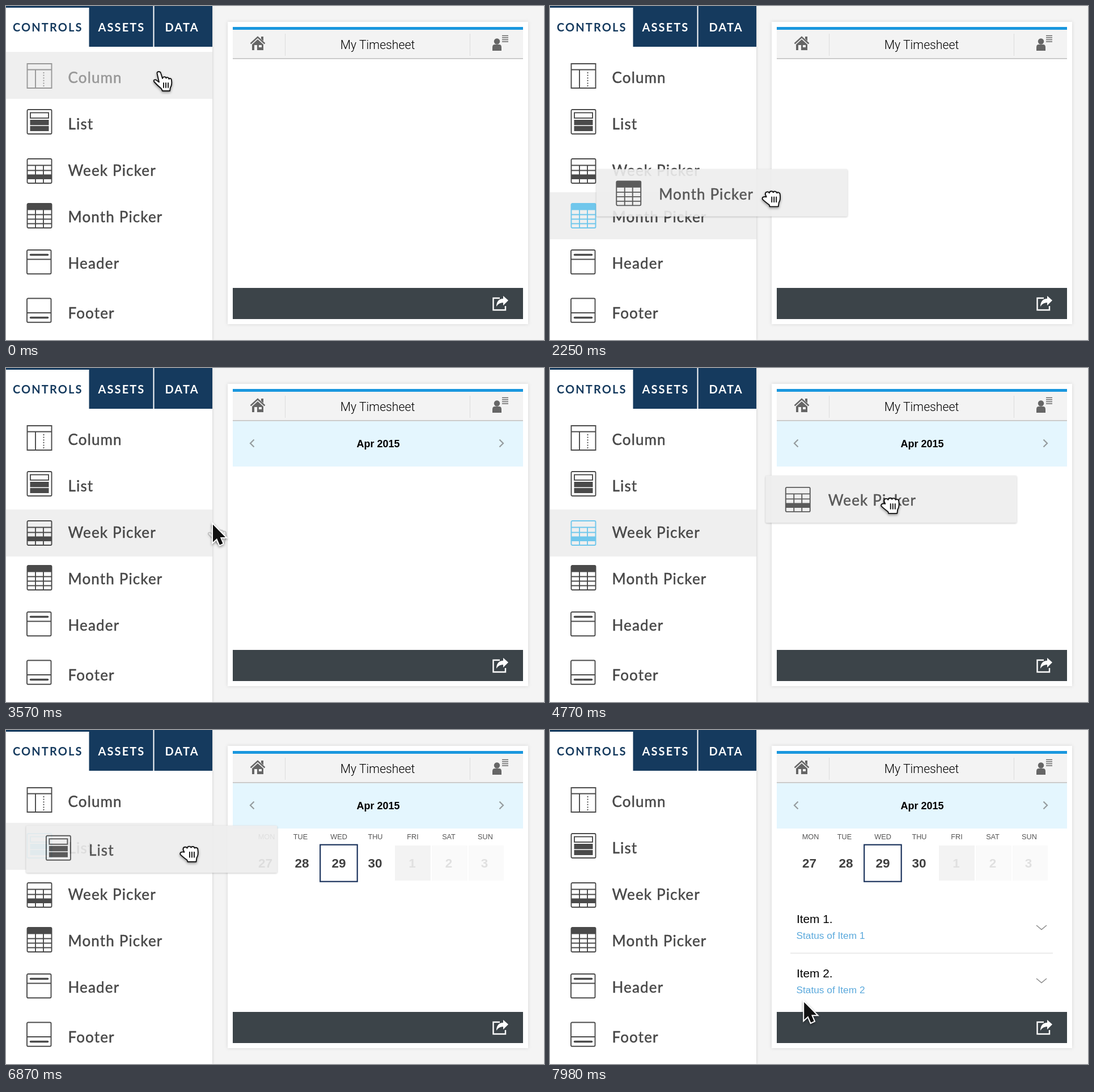
Recreate the animation shown at these times as an HTML page. Size 949 px wide and 590 px high, loop 8000 ms.

```html
<!DOCTYPE html>
<html lang="en">
<head>
<meta charset="utf-8">
<title>App builder</title>
<style>
html, body { margin: 0; width: 100%; height: 100%; overflow: hidden; background: #f4f4f4; }
svg { display: block; width: 949px; height: 590px; }
.label { font: 400 26px Lato, sans-serif; letter-spacing: 1.15px; fill: #484848; stroke: #484848; stroke-width: .5; }
.tab { font: 700 20px Lato, sans-serif; letter-spacing: 2.1px; }
.title { font: 300 21.2px Roboto, sans-serif; text-anchor: middle; }
.arial { font-family: "Liberation Sans", Arial, sans-serif; }
.mid { text-anchor: middle; }
.icon { color: #4a4a4a; fill: none; stroke: currentColor; stroke-width: 1.9; }
.icon .solid { fill: currentColor; stroke: none; }
.icon .bar { stroke-width: 3.6; stroke-linecap: round; }
.pointer { filter: drop-shadow(0 2px 2px rgba(0,0,0,.4)); }
.hand { fill: #fff; stroke: #151515; stroke-width: 1.9; stroke-linejoin: round; stroke-linecap: round; }
</style>
</head>
<body>
<script>
const LOOP = 8000;
const NAVY = '#153a5e';
const frame = '<rect x="1" y="1" width="43" height="43" rx="2"/>';
const smallFrame = '<rect x=".5" y="1" width="42.500" height="42.300" rx="2"/>';
const controls = [
  { name: 'Column', top: 81, iconY: 101, base: 135.7,
    icon: '<path d="M1 1H44V44H1ZM1 11.5H44M15.500 12V44"/><path d="M30 16V42" stroke-dasharray="2 2.6"/>' },
  { name: 'List', top: 164, iconY: 182, base: 217.7, tileIconY: 17,
    icon: frame + '<rect x="6.5" y="6.5" width="32" height="9.5"/><path class="solid" d="M6 19h33v9.500h-33zM6 30h33v9h-33z"/>' },
  { name: 'Week Picker', top: 250, iconY: 269, base: 299.7, tileIconY: 20,
    icon: frame + '<path d="M1 12.500H44M1 21.500H44M15.500 12V44M29.500 12V44"/><path class="solid" d="M1 28.500h43v8.500h-43z"/>' },
  { name: 'Month Picker', top: 329, iconY: 348, base: 381.7, tileIconY: 20,
    icon: frame + '<path d="M15.500 12V44M29.500 12V44M1 20.500H44M1 28.500H44M1 36.500H44"/><path class="solid" d="M1 1h43v11.500h-43z"/>' },
  { name: 'Header', top: 412, iconY: 430, base: 463.7,
    icon: smallFrame + '<path class="bar" d="M7 9.500H37"/><path d="M.5 17.500H43"/>' },
  { name: 'Footer', top: 499, iconY: 515.5, base: 551.7,
    icon: smallFrame + '<path d="M.5 26.500H43"/><path class="bar" d="M7 35H37"/>' }
];

const rect = (x, y, w, h, fill, extra = '') =>
  `<rect x="${x}" y="${y}" width="${w}" height="${h}" fill="${fill}" ${extra}/>`;
const text = (x, y, s, cls, extra = '') => `<text x="${x}" y="${y}" class="${cls}" ${extra}>${s}</text>`;
const line = (d, color, width) => `<path d="${d}" fill="none" stroke="${color}" stroke-width="${width}"/>`;
const iconAt = (x, y, c) => `<g class="icon" transform="translate(${x} ${y})">${c.icon}</g>`;

const panel = rect(0, 0, 364, 590, '#fff', 'style="filter:drop-shadow(0 0 2px rgba(0,0,0,.18))"')
  + rect(0, 0, 147, 3, NAVY) + rect(146.5, 0, 113, 72, NAVY) + rect(261.5, 0, 102.5, 72, NAVY)
  + text(12, 45, 'CONTROLS', 'tab', `fill="${NAVY}"`)
  + text(162.5, 45, 'ASSETS', 'tab', 'fill="#fff"')
  + text(280.5, 45, 'DATA', 'tab', 'fill="#fff"')
  + rect(0, 0, 364, 83, '#efefef', 'id="hover"')
  + controls.map((c, i) => `<g id="row${i}">${iconAt(36.5, c.iconY, c)}${text(109.5, c.base, c.name, 'label')}</g>`).join('');

const homeIcon = line('M431.500 66.500L444 55L456.500 66.500', '#666', 2.4)
  + '<path fill="#666" fill-rule="evenodd" d="M450 54h4v8l-4-4zM434 68l10-9 10 9v10h-20zM438 69v9h5v-9zM446 69v4h5v-4z"/>';
const userIcon = '<g fill="#666"><circle cx="866" cy="62.500" r="5.200"/><path d="M858 79v-6q0-5 4-5h8q4 0 4 5v6z"/></g>'
  + line('M875 52.500h11M875 56h11M875 59.500h11M875 63h11', '#666', 1.4);
const shareIcon = line('M871 516H859.500V537H881V530', '#fff', 2.4)
  + '<path fill="#fff" d="M886 520L877 512V517C869 517 865 523 865 531Q869 524 877 524V529Z"/>';

const card = rect(391, 28, 530, 534, '#fff', 'style="filter:drop-shadow(0 0 3px rgba(0,0,0,.12))"')
  + rect(400, 37, 512, 5, '#1a97de') + rect(400, 42, 512, 50, '#f3f3f3') + rect(400, 92, 512, 1.8, '#c6c6c6')
  + line('M492.500 49V88M818.500 49V88', '#dcdcdc', 1)
  + text(655.5, 76, 'My Timesheet', 'title')
  + homeIcon + userIcon
  + rect(400, 498, 512, 55, '#3c4449') + shareIcon;

const month = rect(400, 94, 512, 80, '#e4f6fe')
  + line('M437.500 126.500L431 133L437.500 139.500M870.500 126.500L877 133L870.500 139.500', '#979da0', 2.3)
  + text(656.5, 140, 'Apr 2015', 'arial mid', 'font-size="18" font-weight="700"');

const days = [['MON', 27, 459.5, 457.5], ['TUE', 28, 519.5, 522], ['WED', 29, 587, 587], ['THU', 30, 651.5, 651],
  ['FRI', 1, 717.5, 716.5], ['SAT', 2, 781, 781], ['SUN', 3, 845.5, 844]];
const week = rect(686, 204, 63, 62, '#f3f3f3') + rect(751, 204, 63, 62, '#fafafa') + rect(816, 204, 62, 62, '#fafafa')
  + rect(554.2, 202.7, 65.5, 65, 'none', 'stroke="#1c345d" stroke-width="2.200"')
  + days.map(([name, date, x, dx]) => text(x, 192.5, name, 'arial mid', 'font-size="12.700" fill="#555"')
    + text(dx, 242.5, date, 'arial mid', `font-size="22.500" font-weight="700" fill="${date < 5 ? '#e0e0e0' : '#404040'}"`)).join('');

const list = [1, 2].map((n, i) => text(435, 341 + i * 96, `Item ${n}.`, 'arial', 'font-size="20.800"')
    + text(434.5, 369 + i * 96, `Status of Item ${n}`, 'arial', 'font-size="17.300" fill="#5ba9dc"')
    + line(`M858 ${345 + i * 94}l9 7.500l9-7.500`, '#8a8a8a', 1.5)).join('')
  + rect(424, 393.5, 463, 1.4, '#e4e4e4');

const handPaths = {
  open: 'M-2.500 3C-3-1 3-1 4 2.500L7 12C8 8 13 8.500 13.500 11.500C14 9 18 10 18.500 13C20 11 23 12 23 15.500C24 22 23 25 21 28L20 34H7L5 30C0 26-4 22-8 17.500C-9.500 14-5 13-2.500 16L1 18.500ZM9 20V28M13 20V28M17 20V28',
  grab: 'M-2 20L-4 15C-4 10 2 10 3 13C4 9 9 9 10 12C11 9 16 10 16.500 13C18 11 22 12 22 15.500C23 23 22 27 20 30L19 37H4L3 34C-1 31-5 28-9 24C-10 20-6 19-2 20ZM7.500 20V29M11.500 20V29M15.500 20V29'
};
const pointers = '<g id="pointer" class="pointer">'
  + Object.entries(handPaths).map(([id, d]) => `<path id="${id}" class="hand" d="${d}"/>`).join('')
  + '<path id="arrow" d="M0 0V31L7 24.500L12 36L17.500 33.500L12.800 22.500H22Z" fill="#111" stroke="#fff" stroke-width="4" paint-order="stroke"/></g>';

const tiles = controls.map((c, i) => c.tileIconY
  ? `<g id="tile${i}" opacity=".9">${rect(1, 0, 443, 83.5, '#eee', 'rx="2" style="filter:drop-shadow(0 1px 1.5px rgba(0,0,0,.24))"')}
     ${iconAt(35.5, c.tileIconY, c)}${text(111.5, 53.5, c.name, 'label')}</g>` : '').join('');

document.body.innerHTML = `<svg viewBox="0 0 949 590">${rect(0, 0, 949, 590, '#f4f4f4')}${panel}${card}
  <g id="month">${month}</g><g id="week">${week}</g><g id="list">${list}</g>${tiles}${pointers}</svg>`;

const $ = id => document.getElementById(id);
const clamp = v => Math.max(0, Math.min(1, v));
const show = (id, on) => $(id).setAttribute('visibility', on ? 'visible' : 'hidden');
const place = (id, x, y) => $(id).setAttribute('transform', `translate(${x.toFixed(2)} ${y.toFixed(2)})`);

// Pointer moves: start, end, target x, target y, bend of the vertical path
const moves = [
  [500, 2040, 303, 358, 1], [2080, 2680, 712, 152, 1], [3000, 3900, 214, 280, 3], [4100, 4890, 618, 216, 1],
  [5250, 6350, 282, 191, 1], [6780, 7290, 691, 248, 1], [7450, 7990, 448, 481, 1]
];
const drags = [
  { row: 3, grab: 2060, drop: 2800, adds: 'month' },
  { row: 2, grab: 4080, drop: 5000, adds: 'week' },
  { row: 1, grab: 6700, drop: 7340, adds: 'list' }
];

function pointerAt(t) {
  let x = 269, y = 116;
  for (const [start, end, toX, toY, bend] of moves) {
    const p = clamp((t - start) / (end - start));
    const e = p * p * (3 - 2 * p);
    x += (toX - x) * e;
    y += (toY - y) * (1 - (1 - e) ** bend);
  }
  return [x, y];
}

function draw(now) {
  const t = now % LOOP;
  const [x, y] = pointerAt(t);
  const active = drags.find(d => t >= d.grab && t < d.drop);

  for (const d of drags) {
    const dragging = d === active;
    show(d.adds, t >= d.drop);
    show('tile' + d.row, dragging);
    $('row' + d.row).firstChild.style.color = dragging ? '#70c7ec' : '';
    if (dragging) {
      const [grabX, grabY] = pointerAt(d.grab);
      place('tile' + d.row, x - grabX, controls[d.row].top + y - grabY);
    }
  }

  const hovered = active ? active.row : x < 372 ? controls.findLastIndex(c => y >= c.top) : -1;
  show('hover', hovered >= 0);
  if (hovered >= 0) $('hover').setAttribute('y', controls[hovered].top);
  $('row0').setAttribute('opacity', 0.52 + 0.48 * clamp(t / 200));

  place('pointer', x, y);
  show('grab', active);
  show('open', !active);
  show('arrow', !active);
  $('open').setAttribute('opacity', clamp((368 - x) / 16));
  $('arrow').setAttribute('opacity', clamp((x - 352) / 10));
}

const began = performance.now();
function tick() {
  draw(performance.now() - began);
  requestAnimationFrame(tick);
}
tick();
</script>
</body>
</html>
```
